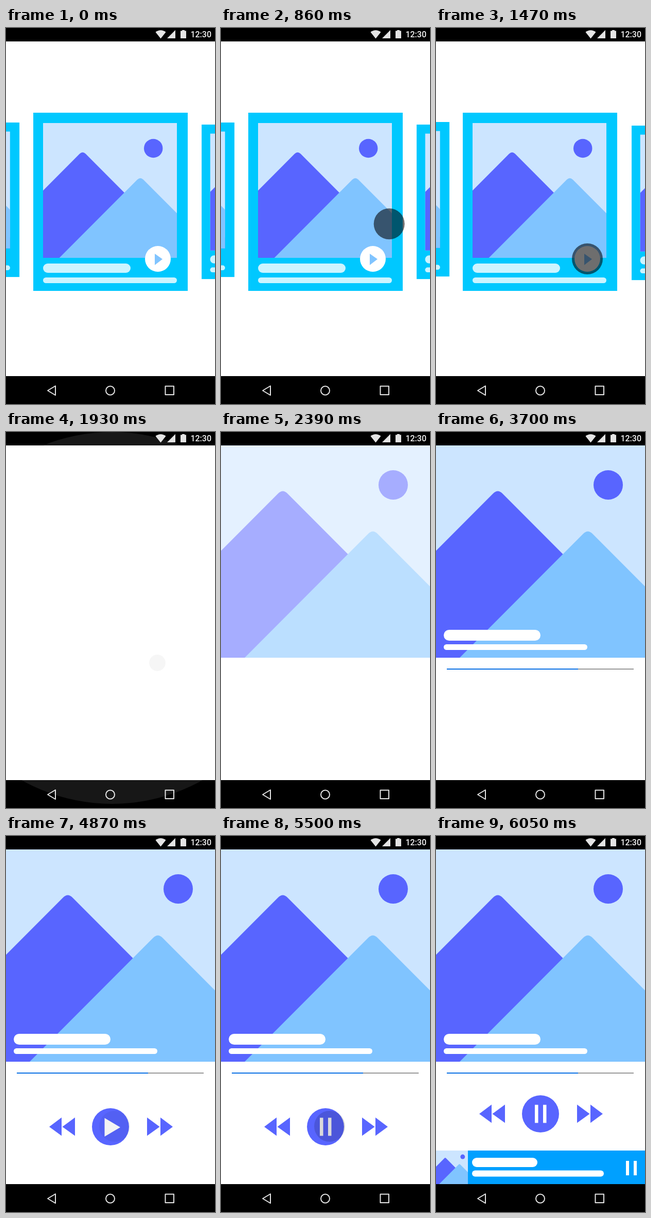
These frames come from a looping animation (406x728 px, 7.38 s). An HTML page:

```html
<!DOCTYPE html>
<html lang="en">
<head>
<meta charset="utf-8">
<title>Music player transition</title>
<style>
  html, body { margin: 0; width: 100%; height: 100%; overflow: hidden; background: #fff; }
  svg#stage { display: block; width: 100vw; height: 100vh; }
  text { font: 500 16px Roboto, "Noto Sans", sans-serif; }
</style>
</head>
<body>
<svg id="stage" viewBox="0 0 406 728">
  <defs>
    <symbol id="art" viewBox="0 0 406 411" preserveAspectRatio="xMidYMin slice">
      <rect width="406" height="411" fill="#cce5ff"/>
      <circle cx="334.500" cy="76.500" r="28.500" fill="#5865ff"/>
      <path d="M0 204L111 93Q120 84 129 93L447 411H0Z" fill="#5865ff"/>
      <path d="M46 411L286 171Q295 162 304 171L544 411Z" fill="#80c4ff"/>
    </symbol>
    <g id="card">
      <rect width="300" height="345" fill="#00c8ff"/>
      <use href="#art" x="19" y="20" width="260" height="261"/>
      <g fill="#ccf4ff">
        <rect x="19" y="292" width="170" height="18" rx="9"/>
        <rect x="19" y="319" width="260" height="11" rx="5.500"/>
      </g>
      <circle cx="242" cy="283" r="25" fill="#fff"/>
      <path d="M236 273L251 283.500L236 295Z" fill="#80c4ff"/>
    </g>
    <path id="skip" d="M71 -18L95.500 0L71 17.500ZM97 -18L121 0L97 17.500Z" fill="#5865ff"/>
  </defs>

  <rect width="406" height="728" fill="#fff"/>

  <g id="list">
    <use id="left" href="#card"/>
    <use id="main" href="#card"/>
    <use id="right" href="#card"/>
  </g>

  <g id="player">
    <use id="cover" href="#art" y="26" width="406" height="411"/>
    <g id="titles" fill="#fff">
      <rect x="15" y="383" width="188" height="21" rx="10.500"/>
      <rect x="15" y="411" width="279" height="11" rx="5.500"/>
    </g>
    <g id="progress">
      <rect x="21" y="458" width="363" height="2" fill="#999"/>
      <rect x="21" y="458" width="255" height="2" fill="#0a70e4"/>
    </g>
    <g id="controls">
      <circle r="36" fill="#5865ff"/>
      <use href="#skip"/>
      <use href="#skip" transform="translate(2) scale(-1 1)"/>
      <path id="play" d="M-11.500 -17L19 1L-11.500 19Z" fill="#fff"/>
      <path id="pause" d="M-11 -17.500h6.500v35h-6.500zM5 -17.500h6.500v35h-6.500z" fill="#fff"/>
    </g>
    <g id="mini">
      <rect width="406" height="65" fill="#00a0ff"/>
      <use href="#art" width="62" height="65"/>
      <g fill="#fff">
        <rect x="70" y="14" width="127" height="18" rx="9"/>
        <rect x="70" y="38.500" width="256" height="12" rx="6"/>
        <path d="M369 20h6v28h-6zM384 20h6v28h-6z"/>
      </g>
    </g>
  </g>

  <path d="M0 0H406V26H0ZM0 674H406V728H0Z"/>
  <g fill="#e4e4e4">
    <path d="M290.500 8Q300.500 0.500 310.500 8L300.500 20.500Z"/>
    <path d="M329 4V20H313Z"/>
    <path d="M342 4h5v1.500h3V20h-11V5.500h3z"/>
    <text x="399" y="18" text-anchor="end" fill="#f4f4f4">12:30</text>
  </g>
  <g fill="none" stroke="#e4e4e4" stroke-width="2" stroke-linejoin="round">
    <path d="M81 702L96 693V711Z"/>
    <circle cx="202.500" cy="702" r="8.500"/>
    <rect x="309.500" y="693.500" width="16.500" height="16.500"/>
  </g>

  <circle id="reveal" fill="#fff"/>
  <circle id="touch"/>
</svg>

<script>
const LOOP = 7380;
const $ = id => document.getElementById(id);
const ramp = (t, a, b) => Math.min(1, Math.max(0, (t - a) / (b - a)));
const mix = (a, b, k) => a + (b - a) * k;
const smooth = k => k * k * (3 - 2 * k);
const easeOut = (k, p) => 1 - (1 - k) ** p;
const show = (id, alpha) => $(id).setAttribute('opacity', alpha);
const move = (id, x, y, s = 1) =>
  $(id).setAttribute('transform', `translate(${x} ${y}) scale(${s})`);

function disc(id, x, y, r, alpha) {
  const el = $(id);
  el.setAttribute('cx', x);
  el.setAttribute('cy', y);
  el.setAttribute('r', r);
  show(id, alpha);
}

function drawTouch(t) {
  if (t < 3000) {
    const go = smooth(ramp(t, 550, 1240));
    const out = ramp(t, 1480, 1960);
    disc('touch', mix(351, 294, go), mix(329, 447, go), mix(30, 15, out),
      0.57 * ramp(t, 540, 700) * (1 - out));
  } else {
    disc('touch', 211, 562, 30, 0.57 * ramp(t, 4850, 5100) * (1 - ramp(t, 5300, 5570)));
  }
}

function draw(t) {
  // cards settle slightly before the tap
  const nudge = t < 1200 ? 0 : 1;
  move('left', -234, 183 - nudge, 0.867);
  move('main', 53 - nudge, 164);
  move('right', 380, 187 + 2 * nudge, 0.867);
  show('list', t < 1820 ? 1 : 0);

  // the button grows into a white page
  const grow = easeOut(ramp(t, 1480, 1930), 1.3);
  disc('reveal', mix(295, 206, grow), mix(447, 360, grow), mix(25, 360, grow),
    t > 1480 ? 1 - ramp(t, 1820, 1942) : 0);

  show('cover', ramp(t, 2210, 2550));
  show('titles', ramp(t, 2850, 3160));
  show('progress', ramp(t, 3440, 3700));
  show('controls', ramp(t, 4060, 4400));

  const paused = t < 5240;
  show('play', paused ? 1 : 0);
  show('pause', paused ? 0 : 1);

  const rise = smooth(ramp(t, 5610, 6050));
  move('controls', 203, mix(563, 538, rise));
  move('mini', 0, mix(674, 609, rise));

  drawTouch(t);
}

function tick(now) {
  draw(now % LOOP);
  requestAnimationFrame(tick);
}
draw(0);
requestAnimationFrame(tick);
</script>
</body>
</html>
```
